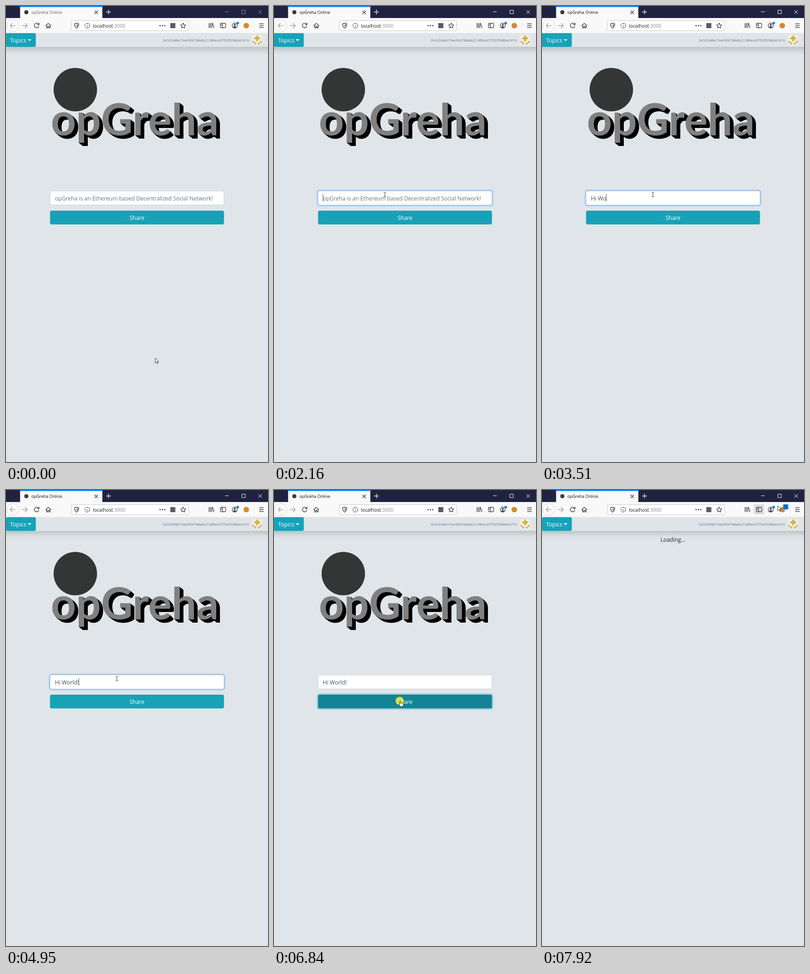
Write an HTML page that moves like this. It is 567 px wide and 987 px high and loops after 7990 ms.

```html
<!DOCTYPE html>
<html lang="en">
<head>
<meta charset="utf-8">
<title>opGreha Online</title>
<style>
  html, body { margin: 0; width: 100%; height: 100%; overflow: hidden; background: #e0e5e9; }
  svg { display: block; width: 100%; height: 100%; }
  text { font: 12px "Open Sans", "Noto Sans", sans-serif; white-space: pre; }
  .word text { font: 700 95px Lato, sans-serif; }
  .icon { fill: none; stroke: #4a4a4f; stroke-width: 1.5; stroke-linecap: round; stroke-linejoin: round; }
  .pale { stroke: #a3a3a6; }
  #nav { filter: drop-shadow(0 6px 6px rgba(0, 0, 0, .17)); }
</style>
</head>
<body>
<svg viewBox="0 0 567 987">
  <rect width="567" height="987" fill="#e0e5e9"/>
  <rect id="nav" x="-30" y="50" width="627" height="38.5" fill="#dfe4e8"/>

  <!-- navigation bar -->
  <rect y="58.5" width="64.5" height="30" rx="3" fill="#17a2b8"/>
  <text x="9" y="79" fill="#fff">Topics</text>
  <path d="M47 72h8l-4 4z" fill="#fff"/>
  <text x="525.5" y="77" text-anchor="end" fill="#6c757d" style="font-size:7.8px">0x3cD48A15ee9047BAdb2138facd7702f53B6eC419</text>
  <rect x="532" y="62.500" width="23" height="23" fill="#ecedec"/>
  <path fill="#d3b02e" d="M541.500 64h4v4h4v4h-4v4h-4v-4h-4v-4h4zM533.500 76h4v3.500h-4zM549.500 76h4v3.500h-4zM537.500 79.500h4v3.500h-4zM545.500 79.500h4v3.500h-4z"/>

  <!-- window title bar -->
  <rect width="567" height="26" fill="#20233f"/>
  <rect x="30.500" width="178" height="27" fill="#f9f9fa"/>
  <rect x="30.500" width="178" height="2.200" fill="#0a84ff"/>
  <circle cx="44" cy="13.500" r="4.500" fill="#3c3c3c"/>
  <text id="tab" x="55" y="17" style="font-size:9px">opGreha Online</text>
  <path class="icon" stroke-width="1.300" d="M192 10.500l6.500 6.500m0-6.500l-6.500 6.500"/>
  <path d="M216.500 13h10.500m-5.250-5.250v10.500" stroke="#e4e4ea" stroke-width="1.400"/>
  <path id="winButtons" fill="none" d="M474 12.500h8M510.500 9h7.500v7.500h-7.500zM546 9l8 8m0-8l-8 8"/>

  <!-- browser toolbar -->
  <rect y="26" width="567" height="32.500" fill="#f9f9fa"/>
  <circle cx="14.500" cy="42.500" r="13" fill="#fbfbfc" stroke="#d2d2d4"/>
  <path class="icon pale" d="M20 42.500H9m4.500-5L9 42.500l4.500 5M35 42.500h11m-4.500-5l4.500 5-4.500 5"/>
  <path class="icon" d="M70.500 39.500a5 5 0 1 0 .5 4.500M71.500 37v3.500H68M86 42.500l5.500-5 5.500 5M88 42v5.500h2.500V44h2.500v3.500H95.500V42"/>
  <rect x="141.500" y="31.500" width="253.500" height="22" rx="2" fill="#fff" stroke="#c9c9cc"/>
  <path class="icon" stroke-width="1.200" d="M153 37l4.500 1.500c0 5-1.500 7.500-4.500 9.500-3-2-4.500-4.500-4.500-9.500z"/>
  <path d="M153 39.500v6c1.500-1.300 2.200-3 2.400-5.300z" fill="#4a4a4f"/>
  <g class="icon" style="stroke-width:1">
    <circle cx="176" cy="42.500" r="5.300"/><path d="M176 42v3.200m0-5.400v.2"/>
  </g>
  <text x="188" y="46.700" fill="#1c1c20" style="font-size:10.400px">localhost<tspan fill="#8a8a8e">:3000</tspan></text>
  <path class="icon" style="stroke-width:3" d="M333.500 42.500h0M338.500 42.500h0M343.500 42.500h0"/>
  <rect x="355.500" y="37" width="11" height="11" fill="#5b5b60"/>
  <path id="star" class="icon" style="stroke-width:1.300"/>
  <path class="icon" d="M439.500 37.500v9.500M442.500 37.500v9.500M445.500 37.500v9.500M447 37.500l3 9.500"/>
  <rect id="sideHover" x="458.500" y="31" width="22.500" height="22" rx="2" fill="#dededf"/>
  <g class="icon" style="stroke-width:1.300">
    <rect x="464" y="37.500" width="11.500" height="9.500" rx="1.500"/>
    <path d="M468.500 37.500v9.500M466 40h.7M466 42h.7"/>
    <circle cx="495" cy="42.500" r="5.500"/>
  </g>
  <circle cx="495" cy="41" r="2.200" fill="#4a4a4f"/>
  <path d="M491 45.500q4-3.500 8 0q-4 4-8 0z" fill="#4a4a4f"/>
  <circle cx="501.500" cy="37" r="2.800" fill="#0a84e8"/>
  <circle cx="520" cy="42.500" r="6" fill="#d58a2e"/>
  <g id="badge">
    <rect x="522" y="31" width="11" height="11" rx="1" fill="#0a7bd6"/>
    <text x="527.500" y="39.800" text-anchor="middle" style="font-size:8.500px">1</text>
  </g>
  <path d="M536.500 27v30" stroke="#eeeeef"/>
  <path class="icon" d="M548.500 38.500h8.500M548.500 42.500h8.500M548.500 46.500h8.500"/>

  <!-- home page -->
  <g id="home">
    <circle cx="150" cy="181" r="47" fill="#343636"/>
    <g class="word" id="word"></g>
    <rect id="ring" x="94" y="399" width="379" height="33" rx="4.500" fill="none" stroke="#a3caf1" stroke-width="3"/>
    <rect x="95.500" y="400.500" width="376" height="30" rx="3.500" fill="#fff" stroke="#ced4da"/>
    <text id="field" x="105.800" y="420.500"></text>
    <rect id="caret" y="407" width="1" height="16.500" fill="#495057"/>
    <rect id="shareRing" x="94" y="441.500" width="379" height="32.500" rx="4.500" fill="none" stroke="#9fd0dc" stroke-width="3"/>
    <rect id="share" x="95.300" y="443" width="376.400" height="29.700" rx="3.500"/>
    <text x="283.500" y="463" text-anchor="middle" fill="#fff">Share</text>
    <g id="suggest">
      <rect x="95.500" y="431" width="375.500" height="16" fill="#f4f6f6"/>
      <text x="99" y="442.300" fill="#111" style="font-size:9.400px">Hello World!</text>
    </g>
  </g>
  <text id="loading" x="283.500" y="112" text-anchor="middle" fill="#212529">Loading...</text>

  <!-- pointer -->
  <g id="pointer">
    <circle id="click" r="9" fill="#f8ec3c" opacity=".85"/>
    <path id="arrow" d="M0 0v10.500l2.400-2.200 1.700 3.700 1.700-.8-1.600-3.500h3.300z" fill="#fff" stroke="#222" stroke-width=".9"/>
    <path id="beam" d="M-2.500-4.500h1.700l.8.800.8-.8h1.700M0-3.700v7.900M-2.500 5h1.700l.8-.8.8.8h1.700" fill="none" stroke="#333"/>
    <path id="hand" d="M0 1q0-1 1-1t1 1v4l1-.5 1 .5 1-.3 1 .6 1-.1.600 1.200v2.600l-1.100 3.200H1L-2.200 7.500q.3-1.500 2.200.5z" fill="#fff" stroke="#222" stroke-width=".9"/>
  </g>
</svg>
<script>
const LOOP = 7990;
const $ = id => document.getElementById(id);
const show = (id, on) => $(id).style.display = on ? "" : "none";
const clamp01 = v => Math.max(0, Math.min(1, v));
const ramp = (t, from, to) => clamp01((t - from) / (to - from));

// time, x, y of the pointer tip
const path = [
  [0, 323, 762], [40, 323, 762], [800, 241, 414], [870, 240, 408], [6260, 240, 408],
  [6620, 272, 456], [7110, 272, 457], [7590, 428, 69], [7690, 428, 69], [7920, 510, 34], [LOOP, 510, 34]
];

// time, field content, caret visible
const typing = [
  [0, "", 0], [1120, "", 1], [1690, "", 0], [2160, "", 1],
  [2470, "H", 0], [2890, "Hi", 1], [3140, "Hi ", 1], [3330, "Hi W", 1],
  [3510, "Hi Wo", 1], [3710, "Hi Wor", 0], [3760, "Hi Wor", 1], [4260, "Hi Wor", 0],
  [4510, "Hi Worl", 0], [4570, "Hi World", 0], [4750, "Hi World", 1],
  [4950, "Hi World!", 1], [5310, "Hi World!", 0], [5870, "Hi World!", 1], [6370, "Hi World!", 0]
];

function pointerAt(t) {
  const i = Math.max(1, path.findIndex(p => p[0] > t));
  const [t0, x0, y0] = path[i - 1], [t1, x1, y1] = path[i];
  const k = ramp(t, t0, t1), e = k * k * (3 - 2 * k);
  return [x0 + (x1 - x0) * e, y0 + (y1 - y0) * e];
}

function buildWordmark() {
  const depth = 8;
  for (let i = depth; i >= 0; i--) {
    $("word").insertAdjacentHTML("beforeend",
      `<text x="${97 + i}" y="${280 + i * 7 / depth}" fill="${i ? "#000" : "#808080"}">opGreha</text>`);
  }
}

function buildStar() {
  const points = Array.from({ length: 10 }, (_, i) => {
    const r = i % 2 ? 2.8 : 6, a = i * Math.PI / 5;
    return `${383.5 + r * Math.sin(a)} ${42.8 - r * Math.cos(a)}`;
  });
  $("star").setAttribute("d", `M${points.join("L")}z`);
}

function render(t) {
  const active = t >= 1050, home = t < 6910;
  $("tab").setAttribute("fill", active ? "#0c0c0d" : "#5c5c60");
  $("winButtons").setAttribute("stroke", active ? "#fff" : "#8d8fa2");
  show("home", home);
  show("loading", !home);
  show("badge", t >= 7400);
  show("sideHover", t >= 7800);

  const [, value, caretOn] = typing.findLast(step => step[0] <= t);
  const field = $("field");
  field.textContent = value || "opGreha is an Ethereum based Decentralized Social Network!";
  field.setAttribute("fill", value ? "#495057" : "#6c757d");
  show("caret", caretOn);
  if (home && caretOn) {
    $("caret").setAttribute("x", 105.5 + (value ? field.getComputedTextLength() : 0));
  }
  $("ring").style.opacity = t < 6780 ? ramp(t, 1130, 1260) : 0;
  $("suggest").style.opacity = ramp(t, 2590, 2650) * (1 - ramp(t, 2890, 3000));

  const [x, y] = pointerAt(t);
  const overField = home && y > 400 && y < 431;
  const overShare = home && y > 443 && y < 473;
  const pressed = t >= 6780 && home;
  $("share").setAttribute("fill", overShare && (!active || pressed) ? "#138496" : "#17a2b8");
  show("shareRing", pressed);
  show("beam", overField);
  show("hand", overShare);
  show("arrow", !overField && !overShare);
  show("click", (t >= 1050 && t < 1260) || pressed);
  $("pointer").setAttribute("transform", `translate(${x} ${y})`);
}

buildWordmark();
buildStar();
const start = performance.now();
function tick() {
  render((performance.now() - start) % LOOP);
  requestAnimationFrame(tick);
}
tick();
</script>
</body>
</html>
```
